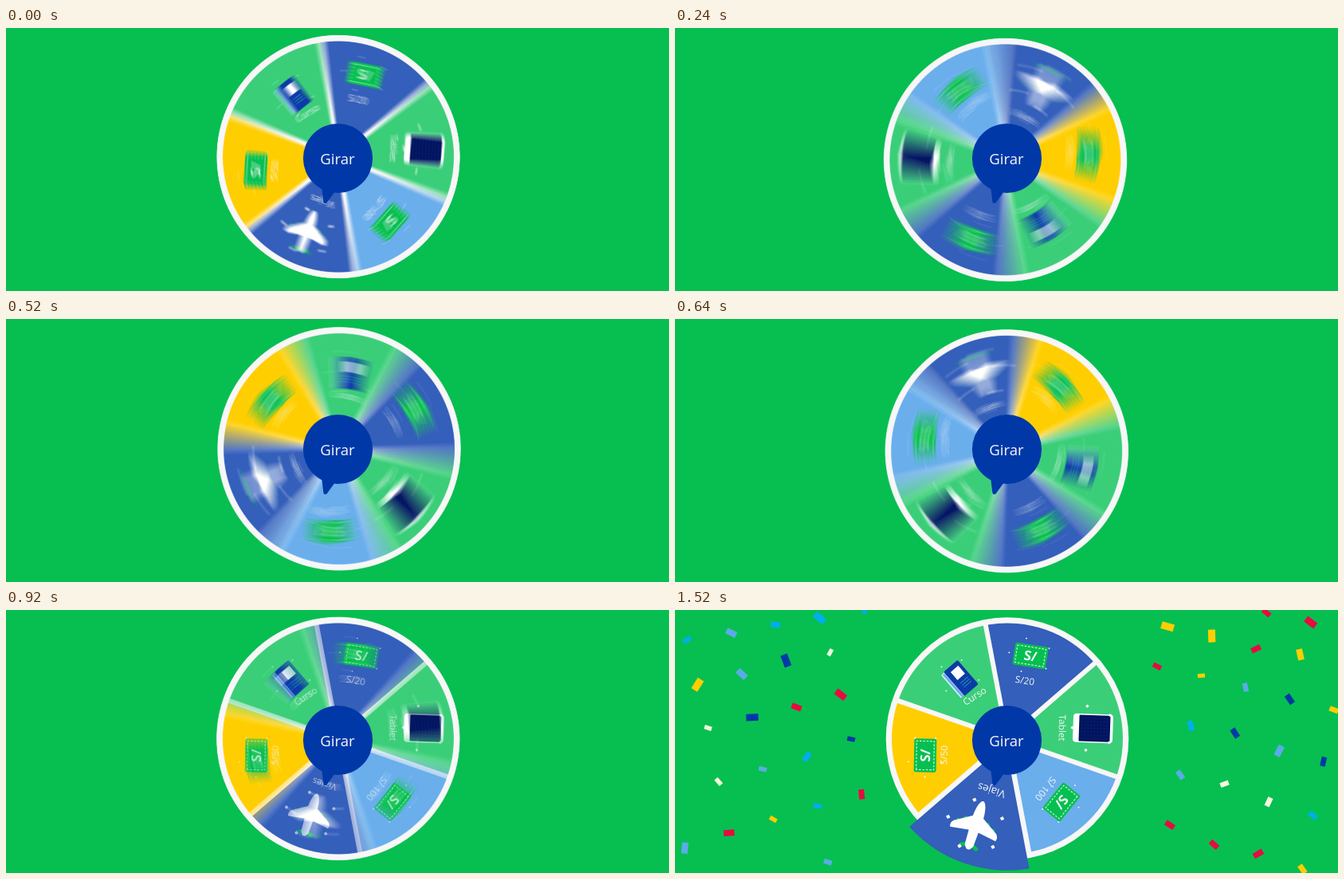
Recreate the animation shown at these times as an HTML page with a canvas. Size 832 by 330 pixels, loop 3.16 s.

```html
<!DOCTYPE html>
<html lang="es">
<head>
<meta charset="utf-8">
<title>Girar</title>
<style>
  html, body { margin: 0; width: 100%; height: 100%; overflow: hidden; background: #06bf50; }
  canvas { display: block; width: 832px; height: 330px; }
</style>
</head>
<body>
<canvas id="stage"></canvas>
<script>
const W = 832, H = 330, LOOP = 3160, STEP = 40;
const SPIN_END = 920, POP_END = 1080, BURST = 1280, BURST_END = 1520;
const TURN = 720, SHUTTER = 15.6, SAMPLES = 25;
const RAD = Math.PI / 180;
const HUB = [416.5, 163.5], PIVOT = [415.8, 163.5], CENTER = [417, 161.5];
const RIM = 152.3, R = 145, GAP = 3, POP = 1.14, FIRST = 19.2;
const C = {
  bg: '#06bf50', white: '#f7f7f7', navy: '#0038a8', blue: '#345fba', green: '#3bce79',
  sky: '#6aaeec', yellow: '#ffce00', cyan: '#00aeef', red: '#e80a40', ink: '#00145f', cream: '#f3f7df'
};
const FONT = '"Open Sans", "Noto Sans", sans-serif';

const clamp = (v, lo, hi) => Math.min(hi, Math.max(lo, v));

function makeCanvas(el, scale) {
  el.width = W * scale;
  el.height = H * scale;
  const g = el.getContext('2d');
  g.scale(scale, scale);
  return g;
}

function at(g, x, y, deg, draw) {
  g.save();
  g.translate(x, y);
  g.rotate(deg * RAD);
  draw(g);
  g.restore();
}

function box(g, x, y, w, h, color, r = 0) {
  g.fillStyle = color;
  g.beginPath();
  g.roundRect(x, y, w, h, r);
  g.fill();
}

function disc(g, [x, y], r, color) {
  g.fillStyle = color;
  g.beginPath();
  g.arc(x, y, r, 0, 7);
  g.fill();
}

function text(g, str, x, y, deg, size = 11.8, weight = 500) {
  at(g, x, y, deg, () => {
    g.font = `${weight} ${size}px ${FONT}`;
    g.textAlign = 'center';
    g.fillStyle = C.white;
    g.fillText(str, 0, size * 0.36);
  });
}

// Sparkles spread evenly on an ellipse around an icon.
function sparks(g, size, rx, ry) {
  for (let i = 0; i < 5; i++) {
    const a = (i * 72 + 36) * RAD;
    at(g, rx * Math.cos(a), ry * Math.sin(a), 45, () => box(g, -size / 2, -size / 2, size, size, '#fff'));
  }
}

function bill(g) {
  box(g, -21, -14, 42, 28, C.bg, 2.5);
  g.strokeStyle = '#d9f7e3';
  g.lineWidth = 1.1;
  g.setLineDash([2.6, 1.8]);
  g.strokeRect(-18, -11, 36, 22);
  g.setLineDash([]);
  text(g, 'S/', 0, 0, 0, 17, 700);
  sparks(g, 1.6, 27, 22);
}

function book(g) {
  box(g, -14, -19, 27, 38, '#dfeefa', 1.5);
  box(g, -12.5, -18, 3, 37, C.sky);
  box(g, -9, -20, 23, 40, '#0b3ba6', 1.5);
  box(g, -2.5, -14, 12.5, 13, '#fff');
  for (let y = 4; y < 12; y += 3.4) box(g, -2.5, y, 12.5, 1, '#2c8fb5');
  sparks(g, 1.6, 22, 28);
}

function tablet(g) {
  box(g, -25, -18, 50, 36, '#fff', 4);
  box(g, -17.5, -16.5, 39, 33, C.ink, 1);
  for (let x = -14.5; x < 20; x += 4)
    for (let y = -13; y < 15; y += 4.2) box(g, x, y, 1, 1, '#1c3478');
  sparks(g, 3, 26, 29);
}

function plane(g) {
  for (const side of [-1, 1]) {
    g.save();
    g.scale(side, 1);
    box(g, 13, -8, 4, 9, C.bg, 2);
    box(g, 21, -3, 4, 8, C.bg, 2);
    at(g, 3, 22, 25, () => box(g, 0, 0, 11, 5, C.bg, 2));
    g.fillStyle = '#fff';
    g.beginPath();
    g.moveTo(4, -13);
    g.lineTo(28, 2);
    g.quadraticCurveTo(32, 6, 30, 11);
    g.lineTo(4, 7);
    g.fill();
    g.restore();
  }
  g.fillStyle = '#fff';
  g.beginPath();
  g.ellipse(0, -8, 7, 24, 0, Math.PI, 0);
  g.lineTo(5.5, 26);
  g.quadraticCurveTo(0, 37, -5.5, 26);
  g.fill();
  sparks(g, 4, 36, 32);
}

// Clockwise from the top: icon is [x, y, tilt], label is [x, y, tilt].
const SLICES = [
  { color: C.blue, draw: bill, icon: [446, 57.5, 9], name: 'S/20', label: [439, 88.5, 9] },
  { color: C.green, draw: tablet, icon: [524.5, 148.5, 2], name: 'Tablet', label: [486, 148, 91] },
  { color: C.sky, draw: bill, icon: [485, 241, 129], name: 'S/ 100', label: [465, 224.5, 128] },
  { color: C.blue, draw: plane, icon: [377, 270.5, 18], name: 'Viajes', label: [397, 226.5, 197], prize: true },
  { color: C.yellow, draw: bill, icon: [314, 182.5, -89], name: 'S/50', label: [337.5, 182, -88] },
  { color: C.green, draw: book, icon: [357, 87, -41], name: 'Curso', label: [376, 108, -33] }
];

function slice(g, s, scale) {
  const half = 30 * RAD, inset = Math.asin(GAP / R);
  g.save();
  g.translate(...CENTER);
  g.scale(scale, scale);
  at(g, 0, 0, FIRST + SLICES.indexOf(s) * 60 - 90, () => {
    g.fillStyle = s.color;
    g.beginPath();
    g.moveTo(GAP / Math.sin(half), 0);
    g.arc(0, 0, R, inset - half, half - inset);
    g.fill();
  });
  if (s.prize) g.scale(1 / POP, 1 / POP);
  g.translate(-CENTER[0], -CENTER[1]);
  at(g, ...s.icon, s.draw);
  text(g, s.name, ...s.label, s.prize ? 13.2 : 11.8);
  g.restore();
}

function wheel(g, pop) {
  disc(g, CENTER, RIM, C.white);
  SLICES.filter(s => !s.prize).forEach(s => slice(g, s, 1));
  slice(g, SLICES.find(s => s.prize), 1 + (POP - 1) * pop);
}

function hub(g) {
  disc(g, HUB, 43.6, C.navy);
  g.strokeStyle = C.navy;
  g.lineWidth = 5;
  g.lineJoin = 'round';
  g.beginPath();
  g.moveTo(398.5, 198);
  g.lineTo(400.8, 217.5);
  g.lineTo(412, 202);
  g.closePath();
  g.fill();
  g.stroke();
  text(g, 'Girar', 416, 164.5, 0, 18.6, 500);
}

function seeded(seed) {
  return () => (seed = seed * 16807 % 2147483647) / 2147483647;
}

// Confetti lands on both sides of the wheel, thinning out towards the floor.
const PIECES = 46, SHADES = [C.red, C.yellow, C.cyan, C.red, '#5caae8', C.yellow, C.cream, C.navy];
const rand = seeded(2024);
const confettiBits = Array.from({ length: PIECES }, (_, i) => {
  const side = i % 2 ? 1 : -1;
  const spread = (i * 0.618) % 1;
  const w = 9 + 7 * rand();
  return {
    x: side * (180 + 235 * spread),
    y: H * ((i + rand()) / PIECES) ** 1.25 - CENTER[1],
    angle: 180 * rand(),
    w, h: w * 0.57,
    color: SHADES[Math.floor(rand() * SHADES.length)]
  };
});

function confetti(g, k) {
  const e = 1 - (1 - k) ** 3;
  for (const { x, y, angle, w, h, color } of confettiBits)
    at(g, CENTER[0] + x * e, CENTER[1] + y * e, angle - (1 - e) * 200,
      () => box(g, -w / 2, -h / 2, w, h, color));
}

const ctx = makeCanvas(document.getElementById('stage'), window.devicePixelRatio || 1);
const sprite = document.createElement('canvas');
wheel(makeCanvas(sprite, 2), 0);
ctx.imageSmoothingQuality = 'high';

// Running average of the wheel while the shutter is open; it opens gently at the start.
function spin(g, t) {
  const angle = TURN * t / SPIN_END;
  const half = SHUTTER / 2 * Math.min(1, 0.6 + t / 100);
  const from = Math.max(0, angle - half), to = angle + half;
  for (let i = 0; i < SAMPLES; i++) {
    const a = Math.min(TURN, from + (to - from) * i / (SAMPLES - 1));
    g.globalAlpha = 1 / (i + 1);
    at(g, ...PIVOT, a, () => g.drawImage(sprite, -PIVOT[0], -PIVOT[1], W, H));
  }
  g.globalAlpha = 1;
}

function render(t) {
  ctx.fillStyle = C.bg;
  ctx.fillRect(0, 0, W, H);
  if (t > BURST) confetti(ctx, clamp((t - BURST) / (BURST_END - BURST), 0, 1));
  if (t <= SPIN_END) {
    spin(ctx, t);
  } else {
    const k = clamp((t - SPIN_END) / (POP_END - SPIN_END), 0, 1);
    wheel(ctx, 1 - (1 - k) ** 1.6);
  }
  hub(ctx);
}

const start = performance.now();
let shown = -1;
function tick() {
  const t = Math.floor(((performance.now() - start) % LOOP) / STEP) * STEP;
  if (t !== shown) render(shown = t);
  requestAnimationFrame(tick);
}
tick();
</script>
</body>
</html>
```
